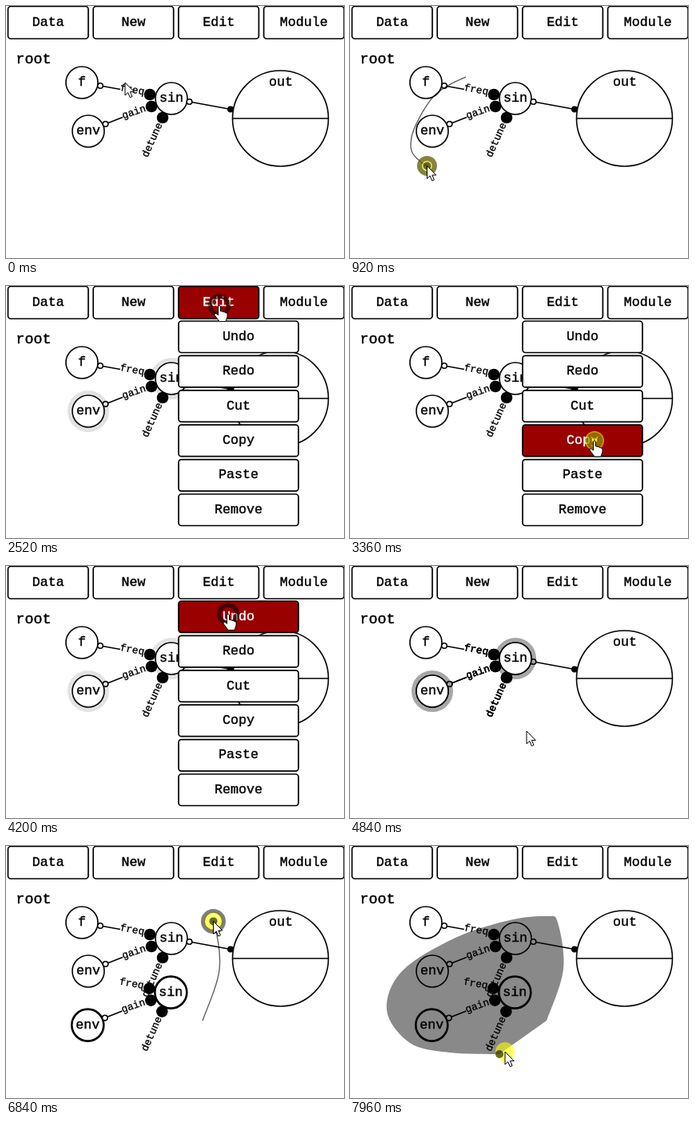
Write an HTML page with a canvas that moves like this. It is 423x316 px and loops after 8000 ms.

```html
<!DOCTYPE html>
<html lang="en">
<head>
<meta charset="utf-8">
<title>Node patch editor</title>
<style>
  html, body { margin: 0; width: 100%; height: 100%; overflow: hidden; background: #fff; }
  canvas { display: block; }
</style>
</head>
<body>
<canvas id="stage" width="423" height="316"></canvas>
<script>
const LOOP = 8000;
const RING_PERIOD = 467;
const RED = '#990000';
const ctx = document.getElementById('stage').getContext('2d');

const boxes = [
  ...['Data', 'New', 'Edit', 'Module'].map((label, i) =>
    ({ label, x: 2.5 + i * 106.7, y: 0.5, w: 100.5, h: 40.5 })),
  ...['Undo', 'Redo', 'Cut', 'Copy', 'Paste', 'Remove'].map((label, i) =>
    ({ label, x: 216, y: 44 + i * 43.4, w: 150, h: 39.5, menu: true }))
];

// A point on a button, right of its centre by dx
function on(label, dx = 0) {
  const b = boxes.find(box => box.label === label);
  return [[b.x + b.w / 2 + dx, b.y + b.h / 2]];
}

// What the pointer does; between steps it glides from one to the next
const idle = (from, to, points) => ({ from, to, points });
const press = (from, to, points) => ({ from, to, points, pressed: true });

const firstLasso = press(286, 1630, [
  [145, 89], [124, 99], [105, 113], [88, 138], [77, 165], [80, 187], [108, 205],
  [155, 206], [212, 190], [254, 163], [265, 125], [240, 82], [195, 80]
]);
const secondLasso = press(6560, 7930, [
  [246, 219], [267, 155], [260, 96], [246, 88], [200, 93], [132, 115],
  [65, 157], [46, 206], [75, 247], [125, 259], [187, 261]
]);
const drag = press(5243, 5870, [[154, 137], [154, 205]]);
const steps = [
  idle(0, 60, [[149, 96]]),
  firstLasso,
  press(2290, 2450, on('Edit')),
  press(3267, 3440, on('Copy', 15)),
  press(3970, 4100, on('Edit', 9)),
  press(4470, 4600, on('Paste')),
  idle(4830, 4900, [[221, 207]]),
  drag,
  secondLasso,
  idle(7960, LOOP, [[194, 258]])
];

const MENU_OPEN = [[2400, 3500], [4080, 4620]];
const SELECTED = 1700;
const PASTED = 4620;

const within = (t, a, b) => t >= a && t < b;
const clamp01 = p => Math.min(1, Math.max(0, p));
const smooth = p => p * p * (3 - 2 * p);
const mix = (a, b, p) => a.map((v, i) => v + (b[i] - v) * p);
const progress = (step, t) => clamp01((t - step.from) / (step.to - step.from));

// Opacity of a selection, throbbing once a second
const throb = t => 0.24 * (1 + Math.cos((t - (t < PASTED ? 860 : 20)) / 1000 * 2 * Math.PI));

// Catmull-Rom curve through the points, p from 0 to 1
function along(points, p) {
  const last = points.length - 1;
  const i = Math.min(Math.floor(p * last), Math.max(0, last - 1));
  const u = p * last - i;
  const at = k => points[Math.min(last, Math.max(0, k))];
  const [a, b, c, d] = [at(i - 1), at(i), at(i + 1), at(i + 2)];
  return b.map((v, n) => v + 0.5 * u * (c[n] - a[n]
    + u * (2 * a[n] - 5 * v + 4 * c[n] - d[n] + u * (3 * (v - c[n]) + d[n] - a[n]))));
}

function pointerAt(t) {
  const i = steps.findIndex(step => t < step.to);
  const step = steps[i];
  if (t >= step.from) return along(step.points, progress(step, t));
  const before = steps[i - 1];
  const p = (t - before.to) / (step.from - before.to);
  return mix(along(before.points, 1), step.points[0], smooth(p));
}

function circle(x, y, r, fill, stroke, width = 1.6) {
  ctx.beginPath();
  ctx.arc(x, y, r, 0, 2 * Math.PI);
  if (fill) { ctx.fillStyle = fill; ctx.fill(); }
  if (stroke) { ctx.strokeStyle = stroke; ctx.lineWidth = width; ctx.stroke(); }
}

function line(points, color = '#000', width = 1.6) {
  ctx.beginPath();
  points.forEach(point => ctx.lineTo(...point));
  ctx.strokeStyle = color;
  ctx.lineWidth = width;
  ctx.stroke();
}

function text(label, x, y, { size = 16.67, color = '#000', angle = 0 } = {}) {
  ctx.save();
  ctx.translate(x, y);
  ctx.rotate(angle * Math.PI / 180);
  ctx.font = `${size}px "Courier New", "Liberation Mono", monospace`;
  ctx.textAlign = 'center';
  ctx.fillStyle = ctx.strokeStyle = color;
  ctx.lineWidth = size / 40;
  ctx.fillText(label, 0, size * 0.29);
  ctx.strokeText(label, 0, size * 0.29);
  ctx.restore();
}

function node(label, x, y, width) {
  circle(x, y, 20, '#fff', '#000', width);
  text(label, x, y - 0.5);
}

const outlet = (x, y) => circle(x, y, 3.3, '#fff', '#000');

function inlet(label, x, y, angle, portX, portY) {
  text(label, x, y, { size: 12.8, angle });
  circle(portX, portY, 7.3, '#000');
}

// The env and sin pair with its inlets
function voice(strokeWidth, bent) {
  node('sin', 207, 116, strokeWidth);
  node('env', 103, 157, strokeWidth);
  const port = bent ? [126, 153] : [124.5, 148];
  line(bent ? [port, [135, 133], [147, 139]] : [port, [146, 139.5]]);
  outlet(...port);
  inlet('freq', 158, 105, 10, 180, 111);
  inlet('gain', 160, 133, -19, 182, 126);
  inlet('detune', 183, 168, -66, 196, 140);
}

function halos(alpha) {
  const color = `rgba(0,0,0,${alpha})`;
  circle(103, 157, 23, null, color, 6);
  circle(207, 116, 23, null, color, 6);
}

function drawPatch(t) {
  text('root', 34.5, 67, { size: 18.3 });
  circle(343.5, 141, 60, '#fff', '#000');
  line([[283.5, 141], [403.5, 141]]);
  text('out', 344, 95);

  node('f', 95, 96);
  line([[118, 100], [143, 104.5]]);
  outlet(118, 100);
  voice();
  line([[229.5, 120], [281, 129.5]]);
  outlet(229.5, 120);
  circle(281, 129.5, 4, '#000');
  if (within(t, SELECTED, PASTED)) halos(throb(t));

  if (t >= PASTED) {
    const p = progress(drag, t);
    ctx.save();
    ctx.translate(-0.7 * p, 67.6 * p);
    voice(p ? 2.6 : 1.6, within(t, drag.from, drag.to + 100));
    if (t < secondLasso.from) halos(throb(t));
    ctx.restore();
  }
}

function drawLasso(lasso, t) {
  const p = progress(lasso, t);
  const trail = Array.from({ length: 81 }, (_, i) => along(lasso.points, p * i / 80));
  line(trail, p < 1 ? 'rgba(0,0,0,.62)' : 'transparent', 1.4);
  if (p === 1) {
    ctx.fillStyle = `rgba(0,0,0,${throb(t)})`;
    ctx.fill();
  }
}

function drawBoxes(t, [px, py]) {
  const open = MENU_OPEN.some(([a, b]) => within(t, a, b));
  let hovering = false;
  for (const { label, x, y, w, h, menu } of boxes) {
    if (menu && !open) continue;
    const hover = within(px, x, x + w) && within(py, y, y + h);
    hovering ||= hover;
    ctx.beginPath();
    ctx.roundRect(x, y, w, h, 3.5);
    ctx.fillStyle = hover ? RED : '#fff';
    ctx.fill();
    ctx.strokeStyle = '#000';
    ctx.lineWidth = 1.7;
    ctx.stroke();
    text(label, x + w / 2, y + h / 2 - 0.7, { color: hover ? '#fff' : '#000' });
  }
  return hovering;
}

function drawPress(t, [x, y]) {
  for (const { from, to } of steps.filter(step => step.pressed)) {
    if (within(t, from, to + 40)) circle(x, y, 12, 'rgba(255,255,0,.6)');
    if (within(t, from, to + 120)) {
      const p = (t - from) / RING_PERIOD % 1;
      const color = `rgba(0,0,0,${0.53 * Math.sin(p * Math.PI)})`;
      circle(x, y, 4 + 15 * p, null, color, 8 - 5 * p);
    }
  }
}

const arrow = new Path2D('M0 0V16L3.7 12.6L6.3 18.7L9 17.5L6.4 11.6H11.3Z');
const hand = new Path2D('M-1.5 1Q0-1 1.5 1V7L4 7.5L7 8.5L10 10V14L8 20H0L-6 12Q-6 9-3.5 10.5L-1.5 12Z');

function drawPointer([x, y], shape) {
  ctx.save();
  ctx.translate(x, y);
  ctx.fillStyle = '#fff';
  ctx.strokeStyle = '#000';
  ctx.lineWidth = 1;
  ctx.fill(shape);
  ctx.stroke(shape);
  ctx.restore();
}

function render(t) {
  const pointer = pointerAt(t);
  const lasso = [firstLasso, secondLasso].find(l => within(t, l.from, l.to + 70));
  ctx.fillStyle = '#fff';
  ctx.fillRect(0, 0, 423, 316);
  drawPatch(t);
  if (lasso) drawLasso(lasso, t);
  const hovering = drawBoxes(t, pointer);
  drawPress(t, pointer);
  if (lasso) circle(...along(lasso.points, progress(lasso, t)), 5, 'rgba(0,0,0,.6)');
  drawPointer(pointer, hovering ? hand : arrow);
}

const origin = performance.now();
function tick() {
  render((performance.now() - origin) % LOOP);
  requestAnimationFrame(tick);
}
tick();
</script>
</body>
</html>
```
